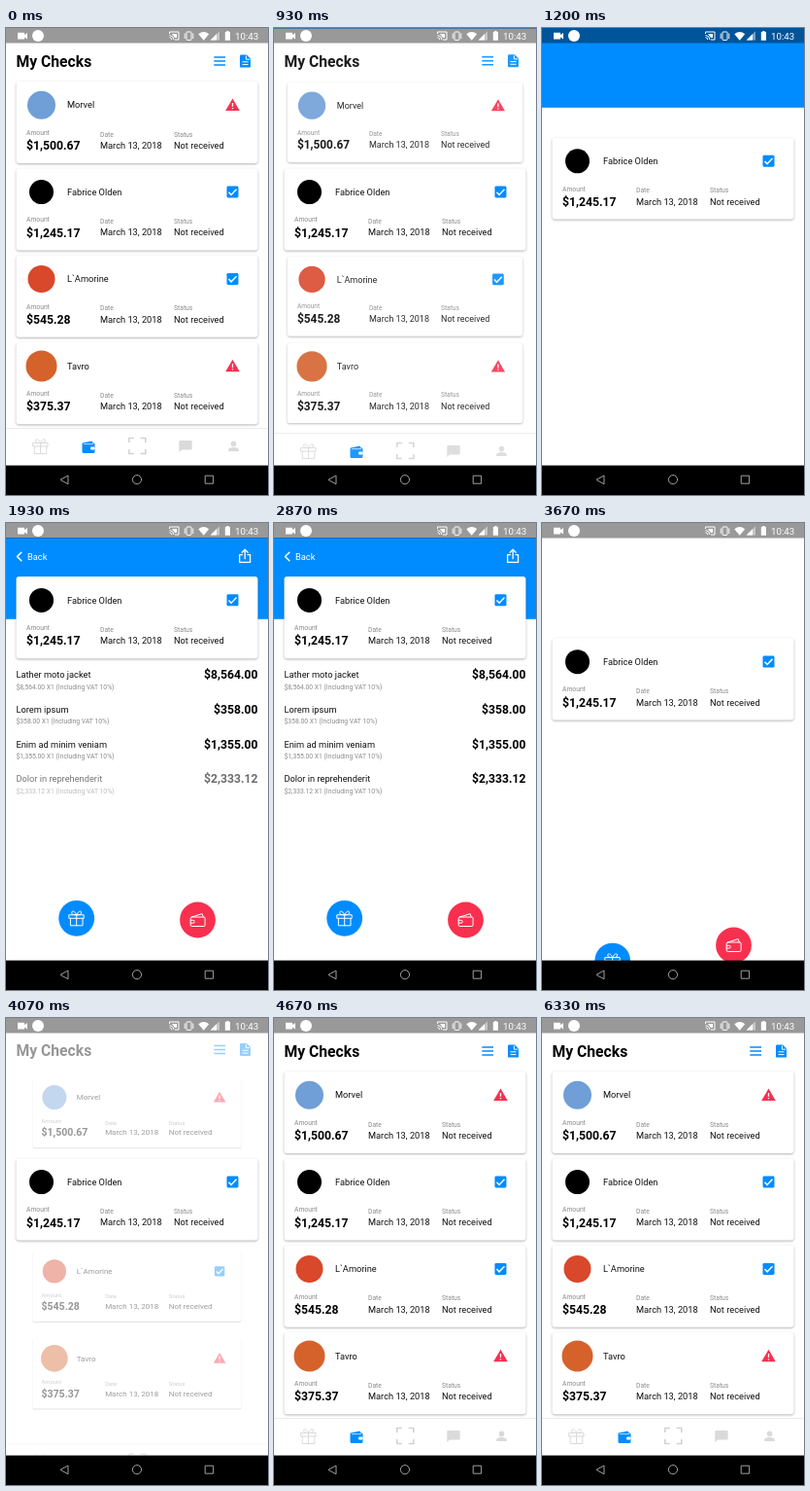
Recreate the animation shown at these times as an HTML page. Size 270 by 480 pixels, loop 6.54 s.

```html
<!DOCTYPE html>
<html lang="en">
<head>
<meta charset="utf-8">
<title>My Checks</title>
<style>
  html, body { margin: 0; width: 100%; height: 100%; overflow: hidden; background: #fff; }
  svg { display: block; width: 100vw; height: 100vh; font-family: Roboto, sans-serif; }
  .card { filter: drop-shadow(0 1px .9px rgba(0, 0, 0, .3)); }
  .body { font-size: 9.25px; fill: #111; }
  .small { font-size: 6.75px; fill: #8a8a8a; }
  .money { font-size: 12.2px; font-weight: 700; fill: #000; }
  .line { fill: none; stroke-linecap: round; stroke-linejoin: round; }
</style>
</head>
<body>
<svg id="stage" viewBox="0 0 270 480"></svg>
<script>
const LOOP = 6540;
const BLUE = '#008cff', RED = '#f8304f', PALE = '#dadada';
const TOP = 54.8, PITCH = 89.4, CARD_H = 84.2;
const OPEN_Y = 55, HOME_Y = TOP + PITCH;
const HEADER_Y = 15, HEADER_H = 83.8;

const checks = [
  { name: 'Morvel', amount: '$1,500.67', logo: '#6f9fd6', r: 14.5, ok: false },
  { name: 'Fabrice Olden', amount: '$1,245.17', logo: '#000', r: 12.5, ok: true },
  { name: 'L`Amorine', amount: '$545.28', logo: '#d9482b', r: 14, ok: true },
  { name: 'Tavro', amount: '$375.37', logo: '#d5622b', r: 16, ok: false }
];
const items = [
  ['Lather moto jacket', '$8,564.00'],
  ['Lorem ipsum', '$358.00'],
  ['Enim ad minim veniam', '$1,355.00'],
  ['Dolor in reprehenderit', '$2,333.12']
];

const text = (x, y, cls, s, extra = '') => `<text x="${x}" y="${y}" class="${cls}" ${extra}>${s}</text>`;
const group = (id, content) => `<g id="${id}">${content}</g>`;
const line = (d, color, w = 1) => `<path class="line" d="${d}" stroke="${color}" stroke-width="${w}"/>`;
const at = (x, y, content) => `<g transform="translate(${x} ${y})">${content}</g>`;

const tick = `<rect x="-6" y="-6" width="12" height="12" rx="1.4" fill="${BLUE}"/>
  <path d="M-4 .2L-1.4 2.9L4-2.7" fill="none" stroke="#fff" stroke-width="1.5"/>`;
const warning = `<path d="M0-6.6L7.3 5.9H-7.3Z" fill="${RED}"/>
  <path d="M0-2.2V1.7M0 2.9V4.2" stroke="#fff" stroke-width="1.3"/>`;
const gift = color => line('M-7.5-3.5H7.5V0H-7.5ZM-6.3 0V7.5H6.3V0M0-3.5V7.5' +
  'M0-3.5C-2-8.5-5.8-8-4.8-5C-4.3-3.6-2-3.5 0-3.5C2-3.5 4.3-3.6 4.8-5C5.8-8 2-8.5 0-3.5', color);
const purse = line('M-6-3H6.3Q7.6-3 7.6-1.7V5.2Q7.6 6.5 6.3 6.5H-6Q-7.3 6.5-7.3 5.2V-1.7Q-7.3-3-6-3Z' +
  'M-6-3L4.6-6.4L5.8-3M-7.3 .3H-4.6Q-3.2 .3-3.2 1.7T-4.6 3.1H-7.3', '#fff');

function card(c, i) {
  const body = `<rect class="card" x="10.5" width="249" height="${CARD_H}" rx="3" fill="#fff"/>
    <circle cx="36.5" cy="24.4" r="${c.r}" fill="${c.logo}"/>` +
    text(63, 27.6, 'body', c.name) + at(233.5, 24.3, c.ok ? tick : warning) +
    text(21, 55.2, 'small', 'Amount') + text(21, 70.4, 'money', c.amount) +
    text(97, 56.8, 'small', 'Date') + text(97, 69.3, 'body', 'March 13, 2018') +
    text(173, 56.8, 'small', 'Status') + text(173, 69.3, 'body', 'Not received');
  return group('card' + i, body);
}

function row([name, price], i) {
  const y = 159.3 + i * 35.7;
  return group('row' + i, text(10.5, y, 'body', name) +
    text(10.5, y + 11.2, 'small', `${price} X1 (Including VAT 10%)`) +
    text(259.5, y + .8, 'money', price, 'text-anchor="end"'));
}

const titleBar = text(10.5, 40.2, '', 'My Checks', 'font-size="15.7" font-weight="700"') +
  `<path d="M214.3 30H226M214.3 34H226M214.3 38H226" stroke="${BLUE}" stroke-width="1.4"/>` +
  at(0, -.4, `<path d="M242.3 28H248L252 32V39.8Q252 41 250.8 41H242.3Q241 41 241 39.8V29.2Q241 28 242.3 28Z" fill="${BLUE}"/>
  <path d="M247.4 28.9V32.6H251.2M243.5 35.2H249.5M243.5 38H249.5" fill="none" stroke="#fff"/>`);

const tabs = `<rect y="411" width="270" height="39" fill="#fff"/><path d="M0 411.5H270" stroke="#ececec"/>` +
  at(35.5, 430, gift(PALE)) +
  at(85, 431, `<path d="M-6-4.5L3.5-6.5L4.5-4.5H5Q6.5-4.5 6.5-3V4.5Q6.5 6 5 6H-5Q-6.5 6-6.5 4.5V-4Z" fill="${BLUE}"/>
    <path d="M-5-3.4H5" stroke="#fff" stroke-width=".7"/><rect x="2" y="-.5" width="4.5" height="3" rx="1" fill="#fff"/>`) +
  at(135.3, 429.5, line('M-8.5-4V-8H-4M4-8H8.5V-4M8.5 4V8H4M-4 8H-8.5V4', '#d2d2d2', 1.6)) +
  at(185, 430, `<path d="M-5.5-6H5.5Q6.7-6 6.7-4.8V2.2Q6.7 3.4 5.5 3.4H-4L-6.7 6V-4.8Q-6.7-6-5.5-6Z" fill="${PALE}"/>`) +
  at(234.5, 430, `<circle cy="-2.6" r="2.8" fill="${PALE}"/><path d="M-5.3 5V3.6Q-5.3 1 0 1T5.3 3.6V5Z" fill="${PALE}"/>`);

const navBar = line('M15.8 30.3L11.5 34.5L15.8 38.7', '#fff', 1.5) +
  text(22, 37.8, '', 'Back', 'font-size="9.25" fill="#fff"') +
  line('M243.5 32.7H240.7V40.4H251.6V32.7H249M246.2 36.7V27.5M243.2 30.2L246.2 27.2L249.2 30.2', '#fff', 1.3);

const statusBar = `<rect width="270" height="15.5" fill="#000" fill-opacity=".4"/>
  <g fill="#fff">
    <path d="M12 4.8H19V7L22 5V11.4L19 9.4V11.6H12Z"/>
    <circle cx="33" cy="8" r="6"/>
    <path d="M168.5 6V4H178V12H174M168.5 7.5Q172.7 7.8 173 12M168.5 9.7Q170.6 9.9 170.8 12" fill="none" stroke="#fff"/>
    <path d="M171 6H176V10H174Z"/>
    <rect x="186" y="4" width="5" height="8.4" rx=".7" fill="none" stroke="#fff"/>
    <path d="M184.2 5.5V11M192.8 5.5V11" stroke="#fff" stroke-width=".9"/>
    <path d="M198.3 6.2Q203.7 1.8 209.2 6.2L203.7 12.8Z"/>
    <path d="M220 3.2V12.6H210.6Z" opacity=".45"/><path d="M217 6.2V12.6H210.6Z"/>
    <path d="M227.2 3H229.6V4H231V12.8H225.8V4H227.2Z"/>
    <text x="236" y="12" font-size="9.7">10:43</text>
  </g>`;

const systemNav = `<rect y="449.6" width="270" height="30.4"/>` +
  line('M56.3 464.2L64 460V468.4ZM139.6 464.2A4.6 4.6 0 1 1 130.4 464.2A4.6 4.6 0 1 1 139.6 464.2' +
    'M205.6 460.2H213.6V468.2H205.6Z', '#a0a0a0');

const button = (id, x, y, color, icon) =>
  group(id, at(x, y, `<circle r="18.4" fill="${color}"/>` + icon));

document.getElementById('stage').innerHTML =
  `<rect width="270" height="480" fill="#fff"/>
  <rect id="header" width="270" height="${HEADER_H}" fill="${BLUE}"/>` +
  group('titleBar', titleBar) +
  [0, 2, 3].map(i => card(checks[i], i)).join('') +
  group('tabs', tabs) + group('navBar', navBar) +
  items.map(row).join('') +
  button('giftButton', 72.7, 406.3, BLUE, gift('#fff')) +
  button('payButton', 197.5, 408, RED, purse) +
  card(checks[1], 1) + statusBar + systemNav;

const el = id => document.getElementById(id);
const move = (id, y) => el(id).setAttribute('transform', `translate(0 ${y})`);
const fade = (id, v) => {
  el(id).setAttribute('opacity', v);
  el(id).setAttribute('visibility', v > 0 ? 'visible' : 'hidden');
};

const ramp = (t, start, end) => Math.min(1, Math.max(0, (t - start) / (end - start)));
const sine = x => (1 - Math.cos(Math.PI * x)) / 2;
const cubic = x => x < .5 ? 4 * x ** 3 : 1 - 4 * (1 - x) ** 3;
const out = x => 1 - (1 - x) ** 3;

function draw(t) {
  // list screen
  const list = 1 - sine(ramp(t, 870, 1150)) + sine(ramp(t, 3850, 4350));
  const scale = .77 + .23 * list;
  fade('titleBar', list);
  move('titleBar', -2.6 * (1 - list));
  for (const i of [0, 2, 3]) {
    const mid = CARD_H / 2, y = TOP + PITCH * i + mid;
    el('card' + i).setAttribute('transform',
      `translate(135 ${y}) scale(${scale}) translate(-135 ${-mid})`);
    fade('card' + i, list);
  }
  move('tabs', 45 * (1 - list));
  fade('tabs', list);

  // blue header comes to rest just below the status bar
  const header = out(ramp(t, 930, 1540)) - cubic(ramp(t, 3190, 3605));
  move('header', -HEADER_H + (HEADER_Y + HEADER_H) * header);

  // chosen card, pulled up a little before it returns
  const lift = cubic(ramp(t, 1000, 1450)), drop = cubic(ramp(t, 3410, 3850));
  const windUp = 7 * sine(ramp(t, 3200, 3400)) * (1 - drop);
  move('card1', HOME_Y + (OPEN_Y - HOME_Y) * (lift - drop) - windUp);

  // detail screen
  fade('navBar', ramp(t, 1530, 1750) - ramp(t, 3190, 3340));
  items.forEach((_, i) => {
    const start = 1500 + 100 * i, end = 3380 - 60 * i;
    fade('row' + i, ramp(t, start, start + 230) - ramp(t, end, end + 290));
    move('row' + i, -sine(ramp(t, 3200, 3400)));
  });
  ['giftButton', 'payButton'].forEach((id, i) => {
    const d = 60 * i;
    move(id, 70 * (1 - out(ramp(t, 1530 + d, 1850 + d)) + ramp(t, 3410 + d, 3740 + d) ** 2));
  });
}

const begin = performance.now();
function frame() {
  draw((performance.now() - begin) % LOOP);
  requestAnimationFrame(frame);
}
draw(0);
requestAnimationFrame(frame);
</script>
</body>
</html>
```
